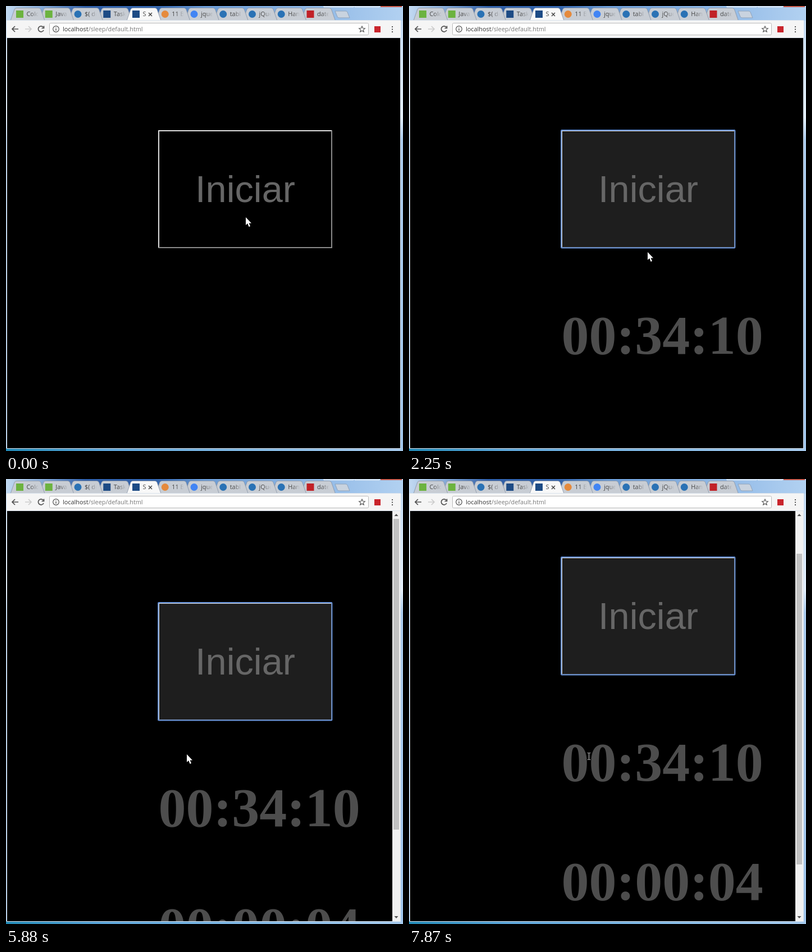
These frames come from a looping animation (707 px wide and 792 px high, 8 s). An HTML page:

```html
<!DOCTYPE html>
<html lang="es">
<head>
<meta charset="utf-8">
<title>Iniciar</title>
<style>
  html, body { margin: 0; width: 100%; height: 100%; overflow: hidden; }
  svg { display: block; width: 707px; height: 792px; }
  .ui { font: 10.9px "Open Sans", sans-serif; }
  .label { font: 66.67px "Liberation Sans", Arial, sans-serif; fill: #666; }
  .clock { font: bold 98px "Liberation Serif", "Times New Roman", serif; fill: #4d4d4d; }
  .icon { fill: none; stroke: #505050; stroke-width: 1.7; }
</style>
</head>
<body>
<svg viewBox="0 0 707 792">
  <defs>
    <linearGradient id="glass">
      <stop offset="0" stop-color="#c3daf2"/>
      <stop offset=".09" stop-color="#87abd8"/>
      <stop offset=".2" stop-color="#2f5ea6"/>
      <stop offset=".38" stop-color="#3465ac"/>
      <stop offset=".5" stop-color="#6b9bd4"/>
      <stop offset=".8" stop-color="#93bbe7"/>
      <stop offset="1" stop-color="#b2d1f1"/>
    </linearGradient>
    <linearGradient id="base">
      <stop offset="0" stop-color="#2189b5"/>
      <stop offset=".25" stop-color="#5ba3d6"/>
      <stop offset="1" stop-color="#a5c9ec"/>
    </linearGradient>
    <linearGradient id="side" x2="0" y2="1">
      <stop offset="0" stop-color="#bfd8f2"/>
      <stop offset=".25" stop-color="#e3effb"/>
      <stop offset=".3" stop-color="#a9caec"/>
      <stop offset="1" stop-color="#9fc4ea"/>
    </linearGradient>
    <linearGradient id="fade" gradientUnits="userSpaceOnUse" x1="36" x2="50">
      <stop offset="0" stop-color="#444"/>
      <stop offset="1" stop-color="#444" stop-opacity="0"/>
    </linearGradient>
    <clipPath id="page"><rect x="2" y="57" width="700" height="730"/></clipPath>
  </defs>

  <rect width="707" height="792" fill="url(#side)"/>
  <rect width="707" height="26" fill="url(#glass)"/>
  <rect y="787" width="707" height="5" fill="url(#base)"/>
  <path d="M566 0V2H619V0M621 0V2H665V0" fill="#c5d9ef" stroke="#e8f1fb"/>
  <path d="M667 0H705V2H667z" fill="#c4584a"/>

  <g id="tabs" class="ui"></g>
  <path d="M586 9H605Q607 9 608 11L612 21H593Q591 21 590 19z" fill="#c9d3df" stroke="#8fa3bb"/>

  <rect x="1" y="25" width="702" height="763" fill="#d9e2ec"/>
  <rect x="1" y="26" width="702" height="30" fill="#f5f5f5"/>
  <rect x="77.5" y="30.5" width="568" height="21" rx="2" fill="#fff" stroke="#b9b9b9"/>
  <g class="icon">
    <path d="M22 41H11M16 36L11 41L16 46"/>
    <path d="M34 41H45M40 36L45 41L40 46" stroke="#ccc"/>
    <path d="M66.5 38A5 5 0 1 0 67 43M67.5 35.5V39.5H63.5"/>
    <circle cx="89" cy="41" r="5.3" stroke-width="1.2"/>
    <path d="M89 40V44M89 37.7V39" stroke-width="1.3"/>
    <path d="M634 36L635.5 39.6L639.3 39.9L636.4 42.4L637.3 46L634 44L630.7 46L631.6 42.4L628.7 39.9L632.5 39.6z" stroke-width="1.1"/>
  </g>
  <text class="ui" x="101" y="45" fill="#333">localhost<tspan fill="#777">/sleep/default.html</tspan></text>
  <rect x="656" y="36" width="11" height="11" fill="#c9252c"/>
  <path d="M687 36h2v2h-2zM687 40.5h2v2h-2zM687 45h2v2h-2z" fill="#505050"/>

  <rect x="2" y="57" width="700" height="730"/>
  <g clip-path="url(#page)">
    <g id="content">
      <rect id="face" x="271" y="221" width="310" height="210"/>
      <path id="topLeft" d="M271 431V221H581L579 223H273V429z"/>
      <path id="bottomRight" d="M581 221V431H271L273 429H579V223z"/>
      <rect id="ring" x="271" y="221" width="309.5" height="209.5" rx="1" fill="none" stroke="#628fd8" stroke-width="1.8"/>
      <text class="label" x="426" y="349" text-anchor="middle">Iniciar</text>
      <text class="clock" id="first" x="271.5" y="619">00:34:10</text>
      <text class="clock" id="second" x="271.5" y="831">00:00:04</text>
    </g>
    <g id="scrollbar">
      <rect x="688" y="57" width="14" height="730" fill="#f1f1f1"/>
      <rect id="thumb" x="690" width="10" height="553" fill="#c1c1c1"/>
      <path d="M691.5 66L695 62L698.5 66zM691.5 778L695 782L698.5 778z" fill="#505050"/>
    </g>
  </g>

  <path id="arrow" d="M0 0V14L3.2 11L5.6 17L8 16L5.6 10.4H10z" fill="#fff" stroke="#000" stroke-width="1.6" paint-order="stroke"/>
  <path id="beam" d="M0 .5H2M3 .5H5M2.5 1V12M0 12.5H2M3 12.5H5" stroke="#ddd"/>
</svg>
<script>
const $ = id => document.getElementById(id);

// Label, icon colour and whether the icon is round
const tabs = [
  ['Colo', '#6cb33f'], ['Java', '#6cb33f'], ['$( do', '#2a72b5', 1], ['Task', '#1d4b85'],
  ['S', '#1d4b85'], ['11 B', '#e58a3c', 1], ['jque', '#4285f4', 1], ['tabl', '#2a72b5', 1],
  ['jQue', '#2a72b5', 1], ['Hand', '#2a72b5', 1], ['date', '#c12127']
];
const ACTIVE = 4;

function tabMarkup([label, colour, round], i) {
  const active = i === ACTIVE;
  return `<g transform="translate(${8 + 51.75 * i})">
    <path d="M0 26L7 6Q8 3.5 11 3.5H50Q53 3.5 54 6L61 26z" fill="${active ? '#f8f8f8' : '#c8cdd4'}" stroke="#8794a6" stroke-width=".8"/>
    <rect x="10" y="8" width="13" height="13" rx="${round ? 6.5 : 0}" fill="${colour}"/>
    <text x="28.5" y="18" fill="url(#fade)">${label}</text>
    ${active ? '<path d="M39 12L45 18M45 12L39 18" stroke="#444" stroke-width="1.5"/>' : ''}
  </g>`;
}
const order = tabs.map((_, i) => i).filter(i => i !== ACTIVE).reverse().concat(ACTIVE);
$('tabs').innerHTML = order.map(i => tabMarkup(tabs[i], i)).join('');

// Pointer: time, x, y
const pointer = [
  [0, 427, 376], [140, 427, 375], [920, 427, 374], [1730, 427, 377],
  [1870, 428, 390], [1990, 427, 414], [2130, 426, 429], [2250, 425, 438],
  [2780, 424, 439], [3170, 424, 440], [3950, 424, 441],
  [4640, 422, 429], [4760, 424, 410], [4890, 427, 390], [5010, 428, 380],
  [5390, 420, 393], [5520, 391, 428], [5640, 353, 465], [5760, 328, 486], [5880, 322, 490],
  [6150, 322, 485], [6950, 320, 486], [7470, 320, 487], [7600, 319, 486], [7870, 318, 487]
];
// Page scroll: time, offset
const scrolls = [[0, 0], [5880, 1], [6020, 71], [6150, 82]];
const at = (keys, t) => keys.findLast(key => key[0] <= t);
const show = (id, on) => $(id).setAttribute('visibility', on ? 'visible' : 'hidden');
const move = (id, x, y) => $(id).setAttribute('transform', `translate(${x} ${y})`);

function render(t) {
  const pressed = (t >= 530 && t < 660) || (t >= 5150 && t < 5270);
  const focused = t >= 530;
  $('face').setAttribute('fill', focused ? '#1e1e1e' : '#000');
  $('topLeft').setAttribute('fill', pressed ? '#8a8a8a' : '#dedede');
  $('bottomRight').setAttribute('fill', pressed ? '#dedede' : '#8a8a8a');
  show('ring', focused);
  show('first', t >= 660);
  show('second', t >= 5270);
  show('scrollbar', t >= 5270);

  const scroll = at(scrolls, t)[1];
  move('content', 0, -scroll);
  $('thumb').setAttribute('y', 71 + Math.floor(scroll * 0.757));

  const [, x, y] = at(pointer, t);
  const overText = t >= 6150;
  show('arrow', !overText);
  show('beam', overText);
  move(overText ? 'beam' : 'arrow', x, y);
}

function tick() {
  render(performance.now() % 8000);
  requestAnimationFrame(tick);
}
tick();
</script>
</body>
</html>
```
